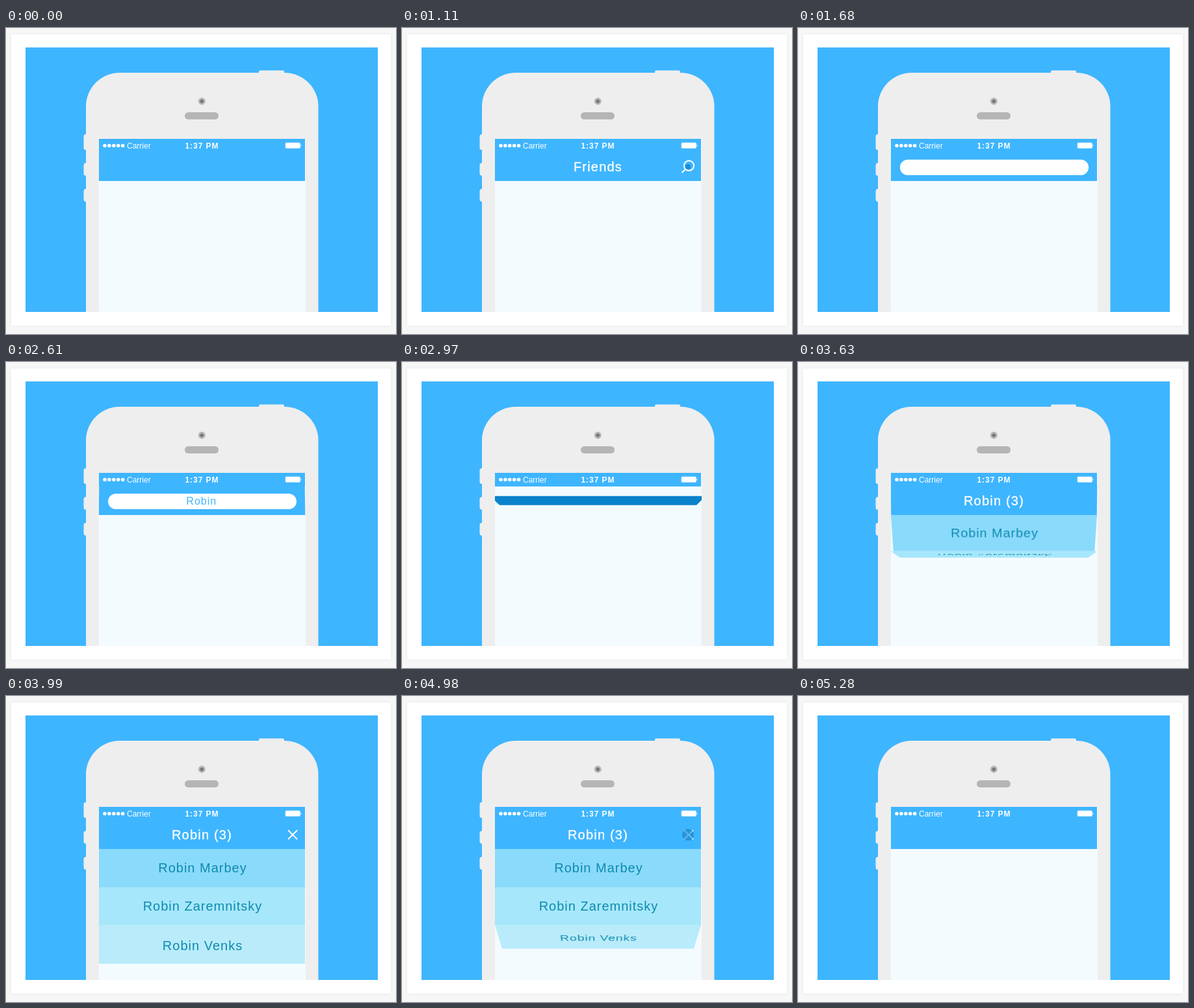
An HTML page for the animation above (5460 ms loop, 600 by 472 pixels).

```html
<!DOCTYPE html>
<html lang="en">
<head>
<meta charset="utf-8">
<title>Friends search</title>
<style>
  html, body { margin: 0; width: 100%; height: 100%; overflow: hidden; background: #f7f7f7; }
  body { position: relative; font: 20px/44px "Liberation Sans", Arial, sans-serif; color: #fff; }
  div, svg { position: absolute; box-sizing: border-box; }
  .card { left: 8px; top: 10px; width: 584px; height: 449px; background: #fff; box-shadow: 0 0 5px #0001; }
  #screen { left: 143px; top: 171px; width: 318px; height: 267px; overflow: hidden; background: #f3fbff; }
  #header { top: 21px; width: 317px; height: 44px; }
  #face { inset: 0; }
  #title { inset: 0; text-align: center; letter-spacing: 1.2px; -webkit-text-stroke: .35px #fff; }
  #field { left: 14px; top: 11px; width: 290px; height: 24px; border-radius: 12px; background: #fff;
    color: #3eb5ff; font-size: 16px; line-height: 24px; letter-spacing: 1px; text-align: center; }
  #caret { display: inline-block; width: 1.5px; height: 16px; margin-left: 1px; background: #3eb5ff; vertical-align: -3px; }
  #face svg { inset: 0; width: 317px; height: 44px; fill: none; stroke: #fff; stroke-width: 2; }
  #tap { border-radius: 50%; background: #0a80c8; }
  .row { width: 317px; color: #0e8aae; letter-spacing: 1px; text-indent: 2px; text-align: center; transform-origin: top; }
</style>
</head>
<body>
<div class="card"></div>
<svg width="600" height="472">
  <clipPath id="stage"><path d="M30 30H572V438H30Z"/></clipPath>
  <g clip-path="url(#stage)">
    <path d="M30 30H572V438H30Z" fill="#3eb5ff"/>
    <g fill="#eee">
      <rect x="389" y="65.5" width="39" height="12" rx="2"/>
      <rect x="119.5" y="164" width="12" height="24" rx="3"/>
      <rect x="119.5" y="208" width="12" height="20" rx="4"/>
      <rect x="119.5" y="248" width="12" height="20" rx="4"/>
      <rect x="123" y="69" width="357.5" height="460" rx="52"/>
    </g>
    <circle cx="301.3" cy="113" r="5.4" fill="#b2b3b2"/>
    <circle cx="301.3" cy="113" r="2.6" fill="#737373"/>
    <rect x="275" y="130" width="52" height="11" rx="5.5" fill="#b4b5b4"/>
  </g>
</svg>
<div id="screen">
  <div id="header">
    <div id="face">
      <div id="title"></div>
      <svg id="lens"><circle cx="298.5" cy="20.3" r="7.6"/><path d="M293 26L287.5 31.3"/></svg>
      <svg id="cross"><path d="M291 15L305 29M305 15L291 29"/></svg>
      <div id="field"><span id="query"></span><span id="caret"></span></div>
      <div id="tap"></div>
    </div>
  </div>
  <svg width="318" height="21" fill="#fff">
    <path d="M0 0H317V21H0Z" fill="#3eb5ff"/>
    <path d="M9 10.5h28" stroke="#fff" stroke-width="5.6" stroke-linecap="round" stroke-dasharray="0 6.9"/>
    <text x="43" y="14.7" font-size="12">Carrier</text>
    <text x="132.5" y="14.7" font-size="12" font-weight="bold" letter-spacing=".95">1:37 PM</text>
    <rect x="286.5" y="5.5" width="23.5" height="9.5" rx="2" opacity=".65"/>
    <rect x="287.5" y="6.5" width="21.5" height="7.5" rx="1"/>
    <path d="M310.5 8.5q2 1.7 0 3.6z"/>
  </svg>
</div>
<script>
const LOOP = 5460, NAME = "Robin";
const $ = id => document.getElementById(id);
const ramp = (t, a, b) => Math.min(1, Math.max(0, (t - a) / (b - a)));
const easeOut = p => 1 - (1 - p) ** 2;
const easeInOut = p => (1 - Math.cos(Math.PI * p)) / 2;

// Each row unfolds (open) and folds away again (close)
const rows = [
  { text: "Marbey", height: 59, color: "#8adafc", open: [3450, 3670], close: [5150, 5280] },
  { text: "Zaremnitsky", height: 58, color: "#a6e7fb", open: [3610, 3830], close: [5050, 5180] },
  { text: "Venks", height: 60, color: "#b9ebfa", open: [3770, 3990], close: [4935, 5070], drop: 4 },
].map(row => {
  const el = document.createElement("div");
  el.className = "row";
  el.textContent = NAME + " " + row.text;
  el.style.cssText = `height:${row.height}px;line-height:${row.height}px;background:${row.color};padding-top:${(row.drop || 0) / 2}px`;
  $("screen").insertBefore(el, $("header"));
  return { ...row, el };
});

function fieldScale(t) {
  const s = t - 1440;
  return s < 0 ? easeOut(ramp(t, 1230, 1440))
    : 1 + .0755 * Math.exp(-s * .0038) * Math.sin(s * Math.PI / 120);
}

function drawTap(t) {
  const start = t < 3000 ? 1080 : 4890;
  const p = ramp(t, start, start + 330);
  const r = 1 + 16 * easeOut(p);
  $("tap").style.cssText = `left:${297 - r}px;top:${22 - r}px;width:${2 * r}px;height:${2 * r}px;
    opacity:${t < start + 25 ? 0 : .8 * (1 - p)}`;
}

function drawHeader(t) {
  const angle = 360 * easeInOut(ramp(t, 2553, 3682));
  const isBack = angle > 90 && angle < 270;
  const found = t > 2970;
  $("header").style.transform = angle % 360 ? `perspective(450px) rotateX(${angle}deg)` : "none";
  $("header").style.background = isBack ? "#0a82ca" : "#3eb5ff";
  $("face").style.visibility = isBack ? "hidden" : "visible";

  const friends = ramp(t, 140, 420) * (1 - ramp(t, 1120, 1290));
  const closing = 1 - ramp(t, 4980, 5270);
  $("title").textContent = found ? NAME + " (3)" : "Friends";
  $("title").style.opacity = found ? closing : friends;
  $("lens").style.opacity = found ? 0 : friends;
  $("cross").style.opacity = ramp(t, 3660, 3870) * closing;

  $("field").style.opacity = found ? 0 : ramp(t, 1230, 1300);
  $("field").style.transform = `scale(${fieldScale(t)})`;
  $("query").textContent = NAME.slice(0, Math.max(0, Math.floor((t - 1700) / 98)));
  $("caret").style.opacity = ramp(t, 1680, 1740) * (1 - ramp(t, 2270, 2400));
}

function drawRows(t) {
  let top = 65;
  for (const { el, height, open, close } of rows) {
    const p = easeOut(ramp(t, ...open)) * (1 - ramp(t, ...close));
    const angle = Math.acos(p);
    el.style.top = top + "px";
    el.style.visibility = p ? "visible" : "hidden";
    el.style.transform = p < 1 ? `perspective(600px) rotateX(${-angle}rad)` : "none";
    top += height * p / (1 + height * Math.sin(angle) / 600);
  }
}

function frame() {
  const t = performance.now() % LOOP;
  drawTap(t);
  drawHeader(t);
  drawRows(t);
  requestAnimationFrame(frame);
}
frame();
</script>
</body>
</html>
```
